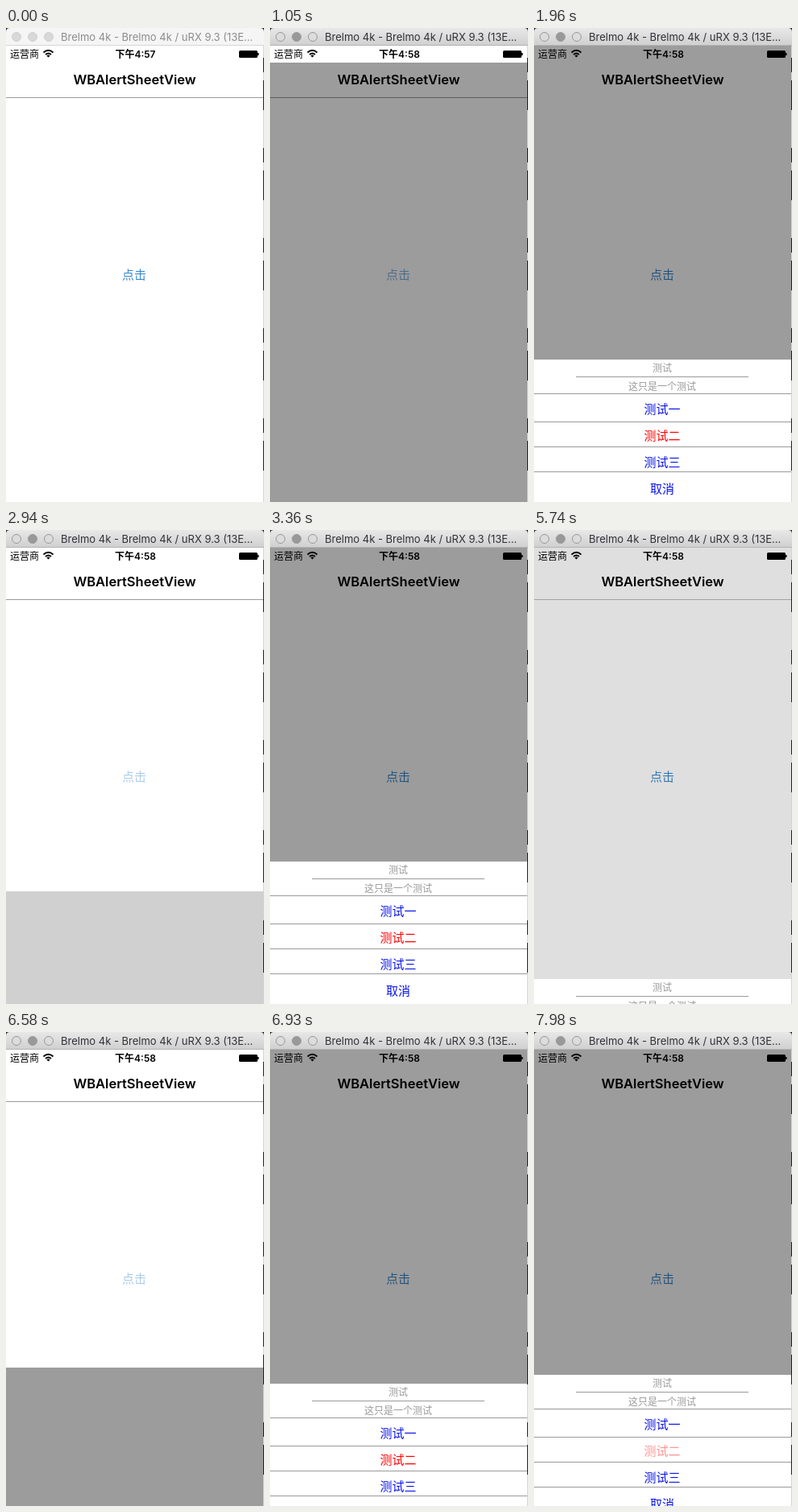
An HTML page that plays this animation: 320 px wide and 589 px high, repeating every 8 s.

```html
<!DOCTYPE html>
<html lang="zh-CN">
<head>
<meta charset="utf-8">
<title>WBAlertSheetView</title>
<style>
  html, body { margin: 0; width: 100%; height: 100%; overflow: hidden; background: #fff; }
  svg { display: block; width: 320px; height: 589px; }
  text { font-family: Inter, "Noto Sans CJK SC", "Noto Sans CJK", sans-serif; text-anchor: middle; }
  .row { font-size: 15px; fill: #0a14e6; }
  .note { font-size: 12px; fill: #999; font-weight: 300; }
</style>
</head>
<body>
<svg viewBox="0 0 320 589">
  <defs>
    <linearGradient id="bar" x2="0" y2="1">
      <stop stop-color="#e8e8e8"/><stop offset="1" stop-color="#cfcfcf"/>
    </linearGradient>
  </defs>
  <rect width="320" height="589" fill="#fff"/>

  <g font-size="12">
    <text x="23" y="36.5">运营商</text>
    <text id="clock" x="160.5" y="36.5" font-weight="600"></text>
    <path d="M46.5 30.5Q52.5 25 58.5 30.5M49 33Q52.5 30 56 33" fill="none" stroke="#000" stroke-width="1.8"/>
    <path d="M50.4 34.4Q52.5 32.8 54.6 34.4L52.5 36.6Z"/>
    <rect x="289" y="28" width="23" height="9" rx="1.5"/>
    <rect x="312" y="31" width="1.5" height="3"/>
  </g>
  <text x="159.5" y="70" font-size="16.5" font-weight="600">WBAlertSheetView</text>
  <rect id="navline" y="86" width="319" height="1" fill="#999"/>
  <text id="button" x="159" y="312" font-size="15" font-weight="300" fill="#3a88cc">点击</text>

  <rect id="dim" width="319" height="567"/>
  <g id="sheet">
    <rect width="319" height="180" fill="#fff"/>
    <g id="lines" fill="#9a9a9a"><rect x="52" y="21" width="214" height="1"/></g>
    <text class="note" x="159" y="14.5">测试</text>
    <text class="note" x="159" y="37.5">这只是一个测试</text>
    <text class="row" id="first" x="159" y="67">测试一</text>
    <text class="row" id="second" x="159" y="100" style="fill:#f00">测试二</text>
    <text class="row" x="159" y="133">测试三</text>
    <text class="row" x="159" y="166">取消</text>
  </g>

  <g id="edge"><rect x="319" width="1" height="589" fill="#d4d4d4"/></g>
  <rect width="320" height="8" fill="#333"/>
  <path id="titlebar" d="M0 22V5Q0 0 5 0H315Q320 0 320 5V22Z"/>
  <rect id="barline" y="21" width="320" height="1"/>
  <g id="lights"></g>
  <text id="caption" x="68" y="16" font-size="13" style="text-anchor:start">Brelmo 4k - Brelmo 4k / uRX 9.3 (13E...</text>
</svg>
<script>
const $ = id => document.getElementById(id);
const LOOP = 8000, STEP = 70, SLIDE = 250, BOTTOM = 589, BAR = 22, SHEET_TOP = 412;
const visits = [
  { open: 829, close: 2057 },
  { open: 2859, close: 5557 },
  { open: 6488.5, close: 7937 }
];

function add(parent, tag, attrs) {
  const el = document.createElementNS('http://www.w3.org/2000/svg', tag);
  for (const name in attrs) el.setAttribute(name, attrs[name]);
  $(parent).append(el);
  return el;
}

for (const y of [42, 77, 108, 139]) add('lines', 'rect', { y, width: 319, height: 1 });
for (let y = 37; y < BOTTOM - 65; y += 112) {
  add('edge', 'rect', { x: 319, y, width: 1, height: 18, fill: '#222' });
  add('edge', 'rect', { x: 319, y: y + 28, width: 1, height: 37, fill: '#222' });
}
const lights = [13, 33, 53].map(cx => add('lights', 'circle', { cx, cy: 11, r: 5.5 }));

const clamp = v => Math.min(1, Math.max(0, v));
const ease = v => (v = clamp(v), v * v * (3 - 2 * v));
const progress = (t, start) => ease((t - start) / SLIDE);

// Button opacity: faint while held, then fading back.
const pressed = (t, down, up) => t < down ? 1 : clamp(.2 + .8 * clamp((t - up) / SLIDE));

function draw(t) {
  const active = t >= 840;
  $('clock').textContent = active ? '下午4:58' : '下午4:57';
  $('titlebar').setAttribute('fill', active ? 'url(#bar)' : '#f5f5f5');
  $('barline').setAttribute('fill', active ? '#b4b4b4' : '#d6d6d6');
  $('caption').setAttribute('fill', active ? '#303038' : '#8c8c8c');
  lights.forEach((light, i) => {
    light.setAttribute('fill', !active ? '#d8d8d8' : i === 1 ? '#999' : '#dcdcdc');
    light.setAttribute('stroke', active ? '#999' : '#d0d0d0');
  });

  const visit = visits.filter(v => t >= v.open).pop() || { open: LOOP, close: LOOP };
  const cover = progress(t, visit.open);
  const rise = progress(t, visit.open + SLIDE);
  const leave = progress(t, visit.close);
  $('dim').setAttribute('y', Math.round(BOTTOM - (BOTTOM - BAR) * cover));
  $('dim').setAttribute('opacity', .39 * clamp((cover - .2) / .1) * (1 - leave * leave));
  $('navline').setAttribute('opacity', cover < 1 ? 1 : leave * leave);
  const top = Math.round(BOTTOM - (BOTTOM - SHEET_TOP) * (rise - leave));
  $('sheet').setAttribute('transform', `translate(0 ${top})`);

  const buttonAlpha = [840, 2800, 6440].map(down => pressed(t, down, down + STEP));
  $('button').setAttribute('opacity', Math.min(...buttonAlpha));
  $('first').setAttribute('opacity', pressed(t, 5390, 5530));
  $('second').setAttribute('opacity', pressed(t, 7770, 7910));
}

function tick(now) {
  draw(Math.floor(now % LOOP / STEP) * STEP);
  requestAnimationFrame(tick);
}
tick(performance.now());
</script>
</body>
</html>
```
